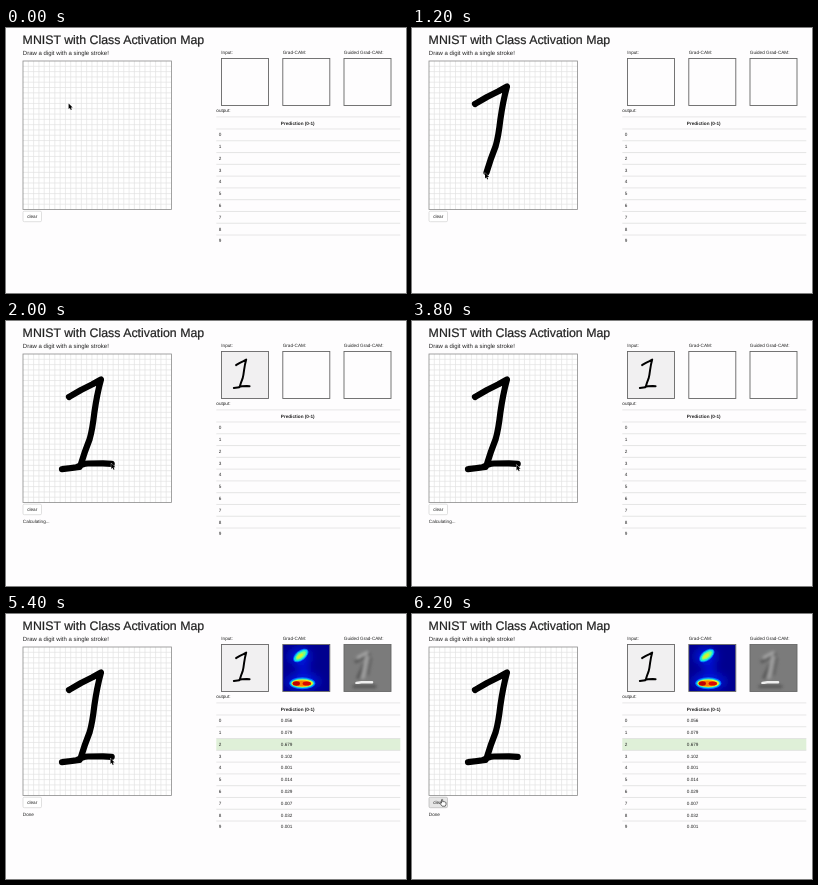
An HTML page that plays this animation: 400x265 px, repeating every 8 s.

```html
<!DOCTYPE html>
<html lang="en">
<head>
<meta charset="utf-8">
<title>Digit demo</title>
<style>
html, body { margin: 0; width: 100%; height: 100%; overflow: hidden; background: #fefdfe; }
svg { display: block; width: 100%; height: 100%; }
text { font: 4.65px "Liberation Sans", Arial, sans-serif; fill: #222; text-rendering: geometricPrecision; }
.title { font-size: 12.35px; stroke: #222; stroke-width: .22; }
.sub { font-size: 6px; }
.bold { font-weight: bold; }
.ink { fill: none; stroke: #000; stroke-width: 6.2; stroke-linecap: round; stroke-linejoin: round; }
.frame { fill: none; stroke: #666; stroke-width: .9; }
</style>
</head>
<body>
<svg viewBox="0 0 400 265" preserveAspectRatio="none">
  <defs>
    <filter id="soft" x="-50%" y="-50%" width="200%" height="200%"><feGaussianBlur stdDeviation="1.6"/></filter>
    <filter id="wide" x="-50%" y="-50%" width="200%" height="200%"><feGaussianBlur stdDeviation="5"/></filter>
    <filter id="heat" x="-50%" y="-50%" width="200%" height="200%"><feGaussianBlur stdDeviation=".7"/></filter>
    <clipPath id="thumb"><rect width="47" height="47"/></clipPath>
  </defs>

  <text class="title" x="16.6" y="16">MNIST with Class Activation Map</text>
  <text class="sub" x="16.8" y="27">Draw a digit with a single stroke!</text>
  <rect x="17" y="33" width="148.5" height="148.5" fill="#fff"/>
  <path id="grid" fill="none" stroke="#e2e2e2" stroke-width=".7"/>
  <rect x="17" y="33" width="148.5" height="148.5" fill="none" stroke="#8c8c8c" stroke-width=".8"/>
  <path id="stroke" class="ink"/>

  <rect id="button" x="17" y="183.2" width="18.5" height="10.5" rx="1.3" stroke-width=".6"/>
  <text x="21.2" y="190.1">clear</text>
  <text id="status" x="16.8" y="202.2"></text>

  <text x="215.3" y="25.7">Input:</text>
  <text x="276.7" y="25.7">Grad-CAM:</text>
  <text x="337.8" y="25.7">Guided Grad-CAM:</text>

  <g id="input" transform="translate(215.5 30.5)" clip-path="url(#thumb)">
    <rect width="47" height="47" fill="#f1f0f1"/>
    <g transform="scale(.3165) translate(-17 -33)" filter="url(#soft)"><path class="ink digit" stroke-width="6.5"/></g>
  </g>

  <g id="maps">
    <g transform="translate(276.8 30.5)" clip-path="url(#thumb)">
      <rect width="47" height="47" fill="#00008f"/>
      <g filter="url(#wide)" fill="#0018e0">
        <ellipse cx="17" cy="12" rx="11" ry="9"/>
        <ellipse cx="20" cy="37" rx="17" ry="8"/>
        <ellipse cx="21" cy="24" rx="4" ry="12"/>
      </g>
      <g filter="url(#heat)">
        <g transform="translate(18 11) rotate(-38)">
          <ellipse rx="9" ry="5" fill="#0070ff"/>
          <ellipse rx="8" ry="4" fill="#16e4e0"/>
          <ellipse rx="6" ry="2.7" fill="#7dff7a"/>
          <ellipse cx="-1" rx="3.6" ry="1.4" fill="#d8f030"/>
        </g>
        <ellipse cx="19.5" cy="38.8" rx="13" ry="6" fill="#0070ff"/>
        <ellipse cx="19.5" cy="38.8" rx="11.8" ry="4.8" fill="#20e8d8"/>
        <ellipse cx="19.5" cy="38.8" rx="10.8" ry="3.9" fill="#f0f020"/>
        <ellipse cx="19" cy="39" rx="9.6" ry="2.9" fill="#ff8000"/>
        <ellipse cx="13.5" cy="39" rx="3.6" ry="2.2" fill="#c00000"/>
        <ellipse cx="24" cy="39" rx="4.2" ry="2" fill="#d80800"/>
      </g>
    </g>
    <g transform="translate(338 30.5)" clip-path="url(#thumb)">
      <rect width="47" height="47" fill="#7b7b7b"/>
      <g fill="none" stroke-linecap="round" filter="url(#soft)">
        <path d="M12 17L25 10M14 33L20 20M10 42H31" stroke="#585858" stroke-width="3.5"/>
        <path d="M14 13L23 8" stroke="#a8a8a8" stroke-width="3"/>
        <path d="M23 12L19 33" stroke="#a2a2a2" stroke-width="3.5"/>
        <path d="M27 14L24 30" stroke="#626262" stroke-width="2.5"/>
      </g>
      <path d="M12.5 38.5L19 37.5L28 37.8" fill="none" stroke="#eee" stroke-width="2.6" stroke-linecap="round" filter="url(#heat)"/>
    </g>
  </g>

  <rect class="frame" x="215.5" y="30.5" width="47" height="47"/>
  <rect class="frame" x="276.8" y="30.5" width="47" height="47"/>
  <rect class="frame" x="338" y="30.5" width="47" height="47"/>

  <text x="210.3" y="84">output:</text>
  <g id="table"><text class="bold" x="274.8" y="96.6">Prediction (0-1)</text></g>

  <path id="arrow" d="M0 0V5.7L1.3 4.5L2.2 6.6L3.2 6.2L2.3 4.1H4.1Z" stroke="#fff" stroke-width=".7" paint-order="stroke"/>
  <path id="hand" transform="translate(27.7 184.8)" fill="#fff" stroke="#111" stroke-width=".6" stroke-linejoin="round"
    d="M1.8 4.3V.9Q2.4 .2 3 .9V2.9Q3.7 2.5 4.2 3.1Q4.9 2.7 5.3 3.3Q6.2 3.1 6.3 4V5.6L5.5 7.4H2.5L.4 4.8Q.7 3.8 1.8 4.3Z"/>
</svg>
<script>
const LOOP = 8000, CELL = 148.5 / 28, ROW = 11.78, TOP = 101;
const CALCULATING = 2000, DONE = 5400, HOVER = 6200;
const $ = id => document.getElementById(id);

// [time, path added by the pen]
const strokes = [
  [400, 'M63 76L64 75.4'],
  [600, 'L75 69L86.5 63.3'],
  [800, 'L95 58.5'],
  [1000, 'Q91 73 88.3 92Q86.5 108 83.7 118'],
  [1200, 'Q78.5 131 74.5 144.5'],
  [1400, 'L73.5 146L56 148.2'],
  [1600, 'L70 146.4Q77 142.6 82 142.5'],
  [1800, 'L97 142.3L105.7 142.8']
];
// [time, x, y] of the pointer tip
const pointer = [
  [0, 62.6, 75.4], [400, 64.4, 75], [600, 86, 61.8], [800, 94.6, 57], [1000, 83, 119],
  [1200, 73, 144.8], [1400, 56, 147.3], [1600, 81, 143.2], [1800, 105.3, 142.2],
  [3800, 104.5, 143.7], [4000, 104.5, 144.3], [5800, 89.6, 154.2], [6000, 45.2, 180.6]
];
const scores = [.056, .079, .679, .102, .001, .014, .029, .007, .032, .001];

function add(parent, tag, attrs, text = '') {
  const el = document.createElementNS('http://www.w3.org/2000/svg', tag);
  for (const key in attrs) el.setAttribute(key, attrs[key]);
  el.textContent = text;
  return parent.appendChild(el);
}

function rule(y) {
  add($('table'), 'path', { d: `M210.3 ${y}H394.3`, stroke: '#dcdcdc', 'stroke-width': .7 });
}

const drawn = t => strokes.filter(s => s[0] <= t).map(s => s[1]).join('');
const show = (el, on) => el.setAttribute('visibility', on ? 'visible' : 'hidden');

let gridPath = '';
for (let i = 1; i < 28; i++) {
  gridPath += `M${17 + i * CELL} 33v148.5M17 ${33 + i * CELL}h148.5`;
}
$('grid').setAttribute('d', gridPath);
document.querySelector('.digit').setAttribute('d', drawn(LOOP));

const best = add($('table'), 'rect', { x: 210.3, y: TOP + 2 * ROW, width: 184, height: ROW, fill: '#dff0d8' });
rule(88.9);
const values = scores.map((score, i) => {
  const y = TOP + i * ROW;
  rule(y);
  add($('table'), 'text', { x: 212.8, y: y + 7.3 }, i);
  return add($('table'), 'text', { x: 274.8, y: y + 7.3 }, score.toFixed(3));
});

function update(t) {
  const done = t >= DONE, hover = t >= HOVER;
  const [, x, y] = pointer.filter(p => p[0] <= t).pop();
  $('stroke').setAttribute('d', drawn(t));
  $('arrow').setAttribute('transform', `translate(${x} ${y})`);
  show($('arrow'), !hover);
  show($('hand'), hover);
  $('button').setAttribute('fill', hover ? '#e6e6e6' : '#fff');
  $('button').setAttribute('stroke', hover ? '#adadad' : '#ccc');
  $('status').textContent = done ? 'Done' : t >= CALCULATING ? 'Calculating...' : '';
  show($('input'), t >= CALCULATING);
  [$('maps'), best, ...values].forEach(el => show(el, done));
}

const start = performance.now();
function tick() {
  update((performance.now() - start) % LOOP);
  requestAnimationFrame(tick);
}
tick();
</script>
</body>
</html>
```
